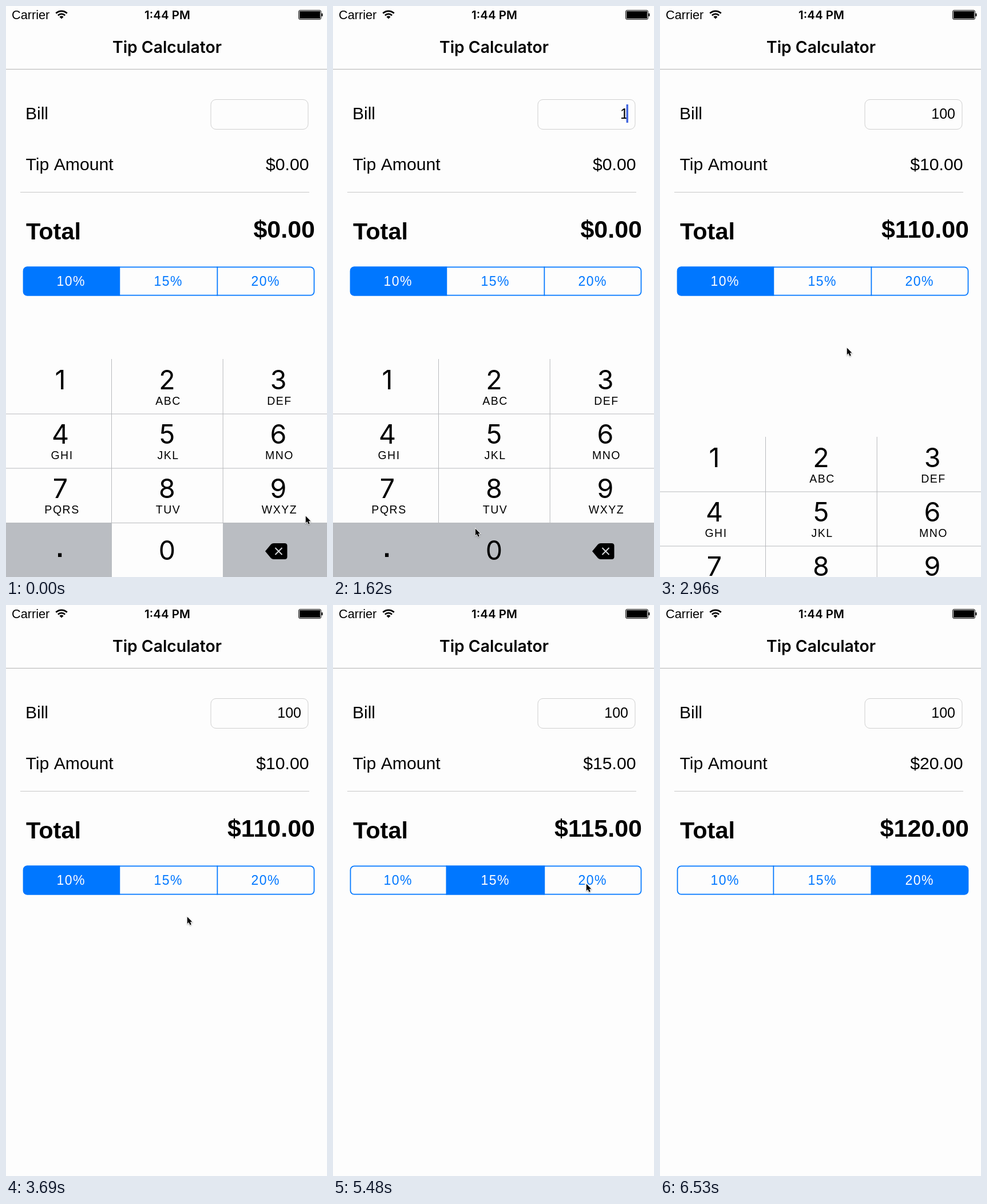
Recreate the animation shown at these times as an HTML page with a canvas. Size 561 by 998 pixels, loop 7150 ms.

```html
<!DOCTYPE html>
<html lang="en">
<head>
<meta charset="utf-8">
<title>Tip Calculator</title>
<style>
  html, body { margin: 0; width: 100%; height: 100%; overflow: hidden; background: #fdfdfd; }
  canvas { display: block; width: 561px; height: 998px; }
</style>
</head>
<body>
<canvas id="stage" width="561" height="998"></canvas>
<script>
const ctx = document.getElementById('stage').getContext('2d');
const LOOP = 7150, TICK = 148.2;
const BG = '#fdfdfd', BLUE = '#0077ff', GREY = '#babdc2', LINE = '#b8babd';
const SANS = '"Liberation Sans", Arial, sans-serif', INTER = 'Inter, sans-serif';
const KEYS = ['', 'ABC', 'DEF', 'GHI', 'JKL', 'MNO', 'PQRS', 'TUV', 'WXYZ'];
const KEY_TOP = 617, KEY_HEIGHT = 95.2, DIGIT_X = [95, 281.5, 476];
const SEGMENTS = [30, 198, 369, 539];

// Pointer stops: tick, x, y
const PATH = [
  [0, 523, 891], [7, 120, 682], [8, 120, 682], [11, 248, 913], [14, 248, 913],
  [19, 326, 597], [22, 326, 597], [28, 306, 492], [30, 306, 492], [31, 296, 640],
  [34, 296, 640], [37, 442, 487], [41, 442, 487], [43, 485, 735]
];

// Value of the last step reached; steps are [tick, value]
const stepAt = (n, steps) => steps.reduce((v, [from, next]) => n >= from ? next : v, null);

function text(str, x, y, size, { align = 'left', weight = 400, color = '#000', gap = 0, font = SANS } = {}) {
  ctx.font = `${weight} ${size}px ${font}`;
  ctx.textAlign = align;
  ctx.letterSpacing = gap + 'px';
  ctx.fillStyle = color;
  ctx.fillText(str, x, y);
}

function rect(x, y, w, h, color) {
  ctx.fillStyle = color;
  ctx.fillRect(x, y, w, h);
}

function roundRect(x, y, w, h, r, stroke, width) {
  ctx.beginPath();
  ctx.roundRect(x, y, w, h, r);
  ctx.strokeStyle = stroke;
  ctx.lineWidth = width;
  ctx.stroke();
}

function polygon(points) {
  ctx.beginPath();
  points.forEach(([x, y]) => ctx.lineTo(x, y));
  ctx.closePath();
}

function statusBar() {
  text('Carrier', 10, 23, 21.7);
  text('1:44 PM', 282, 23, 20.5, { align: 'center', weight: 600, font: INTER });
  ctx.strokeStyle = ctx.fillStyle = '#000';
  for (const r of [13.7, 8.6]) {
    ctx.beginPath();
    ctx.arc(97, 22.5, r, -Math.PI * 0.75, -Math.PI * 0.25);
    ctx.lineWidth = 2.8;
    ctx.stroke();
  }
  ctx.beginPath();
  ctx.moveTo(97, 22.5);
  ctx.arc(97, 22.5, 5, -Math.PI * 0.75, -Math.PI * 0.25);
  ctx.fill();
  roundRect(511.5, 7.5, 39, 16, 2.5, '#000', 1);
  rect(513, 9, 36, 13, '#000');
  rect(551.5, 13, 2, 5, '#000');
}

function form(n) {
  const right = { align: 'right' };
  const tip = stepAt(n, [[0, 0], [20, 10], [29, 15], [40, 20]]);
  const total = tip ? 100 + tip : 0;

  text('Tip Calculator', 281.5, 82, 28.3, { align: 'center', weight: 600, font: INTER });
  rect(0, 110, 561, 1, '#b2b2b2');
  text('Bill', 34, 197.5, 30);
  roundRect(358, 163.5, 170, 52, 9, '#cfcfcf', 1);
  text(stepAt(n, [[0, ''], [9, '1'], [12, '10'], [14, '100']]), 516, 197, 25, right);
  if (stepAt(n, [[0, false], [3, true], [6, false], [8, true], [18, false]])) {
    rect(512.5, 172, 3.5, 32, '#4568df');
  }
  text('Tip Amount', 34.5, 287, 30.2);
  text(`$${tip}.00`, 529.5, 287, 30.2, right);
  rect(25, 325, 505, 1, '#c8c8c8');
  text('Total', 35, 408, 41.5, { weight: 700 });
  text(`$${total}.00`, 540, 405, 43, { align: 'right', weight: 700 });
}

function segments(n) {
  const selected = stepAt(n, [[0, 0], [30, 1], [41, 2]]);
  const pressed = stepAt(n, [[0, -1], [29, 1], [30, -1], [40, 2], [41, -1]]);
  ctx.save();
  ctx.beginPath();
  ctx.roundRect(30, 455.5, 509, 51, 7);
  ctx.clip();
  ['10%', '15%', '20%'].forEach((label, i) => {
    const x = SEGMENTS[i], w = SEGMENTS[i + 1] - x;
    if (i === selected) rect(x, 455, w, 52, BLUE);
    if (i === pressed) rect(x, 455, w, 52, '#d3e8fe');
    if (i) rect(x - 0.5, 455, 1.75, 52, BLUE);
    const color = i === selected ? '#fff' : i === pressed ? '#369aff' : BLUE;
    text(label, 113.7 + i * 170, 489, 23, { align: 'center', color, gap: 1.4 });
  });
  ctx.restore();
  roundRect(30.5, 456.4, 508, 49.3, 6.5, BLUE, 1.75);
}

function backspace() {
  ctx.fillStyle = '#000';
  ctx.beginPath();
  ctx.moveTo(453, 953);
  ctx.lineTo(463, 941);
  ctx.quadraticCurveTo(465, 939, 468, 939);
  ctx.lineTo(487, 939);
  ctx.quadraticCurveTo(491.5, 939, 491.5, 943.5);
  ctx.lineTo(491.5, 962.5);
  ctx.quadraticCurveTo(491.5, 967, 487, 967);
  ctx.lineTo(468, 967);
  ctx.quadraticCurveTo(465, 967, 463, 965);
  ctx.fill();
  ctx.strokeStyle = '#d5d7da';
  ctx.lineWidth = 2;
  ctx.beginPath();
  for (const d of [-6, 6]) {
    ctx.moveTo(476.5 - d, 947);
    ctx.lineTo(476.5 + d, 959);
  }
  ctx.stroke();
}

function keypad(n) {
  const drop = stepAt(n, [[0, 0], [20, 136], [21, 340], [22, 381]]);
  if (drop > 380) return;
  const pressed = stepAt(n, [[0, null], [8, 1], [9, null], [11, 0], [14, null]]);
  const digit = { align: 'center', font: INTER };
  ctx.save();
  ctx.translate(0, drop);
  rect(0, KEY_TOP, 561, 381, BG);
  rect(0, 903, 185, 95, GREY);
  rect(379, 903, 182, 95, GREY);
  if (pressed === 1) rect(0, KEY_TOP, 185, 96, GREY);
  if (pressed === 0) rect(185, 903, 194, 95, GREY);
  for (const y of [712.5, 807.5, 903]) rect(0, y, 561, 1, LINE);
  for (const x of [184, 378.7]) rect(x, KEY_TOP, 1, 286, LINE);
  KEYS.forEach((letters, i) => {
    const col = i % 3, y = KEY_TOP + KEY_HEIGHT * Math.floor(i / 3);
    text(i + 1, DIGIT_X[col], y + 52.7, 46.5, digit);
    text(letters, [98, 283.5, 478][col], y + 80, 19.5, { align: 'center', gap: 1.5 });
  });
  text('.', 94, 963, 44, { align: 'center', weight: 700 });
  text('0', DIGIT_X[1], 967.5, 46.5, digit);
  backspace();
  ctx.restore();
}

function pointer(n) {
  if (n > 43) return;
  const i = Math.max(1, PATH.findIndex(stop => stop[0] >= n));
  const [t0, x0, y0] = PATH[i - 1], [t1, x1, y1] = PATH[i];
  const p = (n - t0) / (t1 - t0), ease = p * p * (3 - 2 * p);
  ctx.save();
  ctx.translate(x0 + (x1 - x0) * ease, y0 + (y1 - y0) * ease);
  polygon([[0.8, 0.5], [0.8, 12.5], [3.5, 10], [5.6, 14.8], [7.8, 13.8], [5.8, 9.2], [9.4, 9.2]]);
  ctx.shadowColor = 'rgba(0,0,0,.35)';
  ctx.shadowBlur = 2;
  ctx.shadowOffsetY = 1;
  ctx.strokeStyle = '#fff';
  ctx.lineWidth = 1.6;
  ctx.stroke();
  ctx.shadowColor = 'transparent';
  ctx.fillStyle = '#000';
  ctx.fill();
  ctx.restore();
}

function draw(now) {
  const n = Math.floor((now % LOOP + 16) / TICK);
  rect(0, 0, 561, 998, BG);
  statusBar();
  form(n);
  segments(n);
  keypad(n);
  pointer(n);
}

const start = performance.now();
function loop() {
  draw(performance.now() - start);
  requestAnimationFrame(loop);
}
loop();
</script>
</body>
</html>
```
